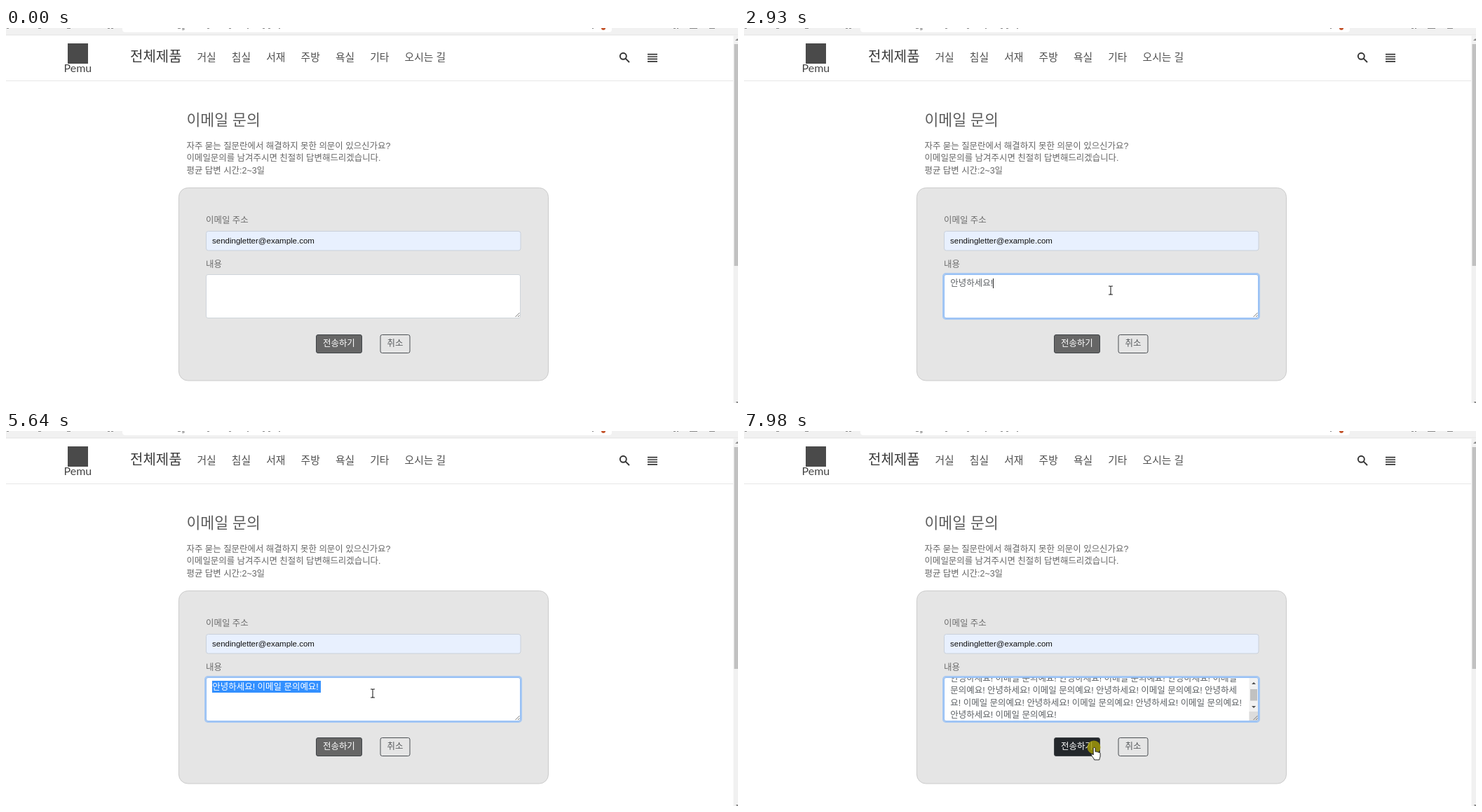
An HTML page that plays this animation: 1044x536 px, repeating every 8 s.

```html
<!DOCTYPE html>
<html lang="ko">
<head>
<meta charset="utf-8">
<title>이메일 문의</title>
<style>
  html, body { margin: 0; width: 100%; height: 100%; overflow: hidden; background: #fff; }
  #stage { position: absolute; left: 0; top: 0; width: 1044px; height: 536px; overflow: hidden; }
  #stage, text { font-family: "Liberation Sans", "Noto Sans CJK KR", "Noto Sans CJK", sans-serif; }
  svg { position: absolute; left: 0; top: 0; }
  #box, #ring {
    position: absolute; left: 285px; top: 352px; width: 447px; height: 61px;
    border: 1px solid #ced4da; border-radius: 3px; overflow: hidden;
  }
  #box { background: #fff; }
  #ring { opacity: 0; border-color: #8fbcf6; box-shadow: 0 0 0 2px #a6c8f3; }
  #typed {
    position: absolute; left: 8.3px; top: 4.3px; width: 432px;
    font-size: 12.47px; line-height: 17.42px; color: #5c6064; white-space: pre-wrap;
  }
  #typed i {
    display: inline-block; width: 1px; height: 14px; margin-right: -1px;
    vertical-align: -2.7px; background: #222;
  }
  #typed u { text-decoration: none; box-shadow: inset 0 -1px #5c6064; }
  #typed b { font-weight: 400; color: #fff; background: #3390ff; padding: 1.75px 0; }
</style>
</head>
<body>
<div id="stage">
  <svg id="page" width="1044" height="536">
    <rect width="1044" height="10" fill="#f1f1f1"/>
    <path d="M166 0H864V2Q864 6 860 6H170Q166 6 166 2Z" fill="#fff"/>
    <path d="M0 10H1044" stroke="#e3e3e3"/>
    <path d="M1 .5h3M46 .5h4M87 .5h5M145 .5h3M150 .5h3M245 .5h4M251 .5h3v2h-3M287 .5h3M318 .5h3M344 .5h2M366 .5h3M374 .5h3M389 .5h2M836 .5h2M952 .5h3M957 .5h2M975 .5h11M1003 .5h8" fill="none" stroke="#888"/>
    <circle cx="852" cy="0" r="3" fill="#c4552d"/>

    <rect x="1037.5" y="10.5" width="7" height="526" fill="#f1f1f1"/>
    <rect x="1038.5" y="23" width="6" height="317" fill="#c1c1c1"/>
    <path d="M1040 18l3-3 1 1v2zM1041 534h3v2h-2z" fill="#8a8a8a"/>
    <path d="M0 75.5H1037" stroke="#e6e6e6"/>

    <rect x="88" y="22" width="29" height="29" fill="#4a4a4a"/>
    <text x="82.5" y="63" font-size="16" fill="#444" style="font-family:Lato,sans-serif">Pemu</text>

    <g fill="none" stroke="#333" stroke-width="1.9">
      <circle cx="880.3" cy="40.3" r="4.5"/>
      <path d="M883.6 43.6L889 49"/>
      <path d="M915 37.6h14M915 41h14M915 44.4h14M915 47.8h14" stroke-width="1.7"/>
    </g>

    <rect x="246.5" y="228.5" width="527" height="275.5" rx="13" fill="#e5e5e5" stroke="#cbcbcb"/>
    <rect x="285.5" y="290.5" width="448.5" height="27.5" rx="3" fill="#e8f0fe" stroke="#c9d0da"/>
    <text x="294" y="308" font-size="11.5" fill="#111">sendingletter@example.com</text>
    <rect id="send" x="442.5" y="438.5" width="65" height="26" rx="2.5" stroke="#3f4347"/>
    <rect x="534" y="438.5" width="42" height="26" rx="2.5" fill="none" stroke="#4b4f53"/>
  </svg>

  <div id="box"><div id="typed"></div></div>

  <svg width="1044" height="536">
    <g id="bar">
      <rect x="720.5" y="353" width="13" height="61" fill="#f1f1f1"/>
      <rect x="720.5" y="401" width="13" height="13" fill="#dcdcdc"/>
      <rect x="722" y="369" width="10" height="16.5" fill="#c1c1c1"/>
      <path d="M724 362l3-3 3 3zM724 393l3 3 3-3z" fill="#505050"/>
    </g>
    <path d="M726.5 413l6-6M730 413l2.5-2.5" stroke="#777"/>
  </svg>
  <div id="ring"></div>

  <svg width="1044" height="536">
    <g id="mouse">
      <circle id="press" r="9.5" fill="#a39b08" fill-opacity=".82"/>
      <path id="beam" d="M-3-6h2.2L0-5.3L.8-6H3M-3 6h2.2L0 5.3L.8 6H3M0-5.3V5.3" fill="none" stroke="#222" stroke-width="1.1"/>
      <path id="arrow" d="M0 0V16L3.7 12.6L6.2 18.3L8.6 17.2L6.2 11.7H11.4Z" fill="#fff" stroke="#111" stroke-width=".9"/>
      <path id="hand" d="M-.8 1.6C-.8 0 2 0 2 1.6V6.5C3 5.8 4.3 6.1 4.5 7C5.5 6.4 6.7 6.8 6.9 7.7C8 7.2 9.1 7.8 9.1 9V13C9.1 15 7.7 16 7.7 18H.6C.5 16-3.6 12.5-3.6 10.8C-3.6 9.4-2 9.4-.8 11Z" fill="#fff" stroke="#111" stroke-width=".9"/>
    </g>
  </svg>
</div>
<script>
const LOOP = 8000, FOCUS = 400, HOVER = 7390;
const $ = id => document.getElementById(id);
const clamp = v => Math.max(0, Math.min(1, v));
const show = (id, on) => { $(id).style.display = on ? '' : 'none'; };

// Each label: left, middle of the line, size, colour, text
const labels = [
  [177, 41, 20, '#3a3a3a', '전체제품'],
  ...['거실', '침실', '서재', '주방', '욕실', '기타', '오시는 길']
    .map((s, i) => [272.5 + i * 49.35, 41.8, 14.8, '#505050', s]),
  [257.5, 131.3, 21.6, '#5a5a5a', '이메일 문의'],
  [257.5, 168.2, 12.45, '#666', '자주 묻는 질문란에서 해결하지 못한 의문이 있으신가요?'],
  [257.5, 185.6, 12.45, '#666', '이메일문의를 남겨주시면 친절히 답변해드리겠습니다.'],
  [257.5, 203, 12.45, '#666', '평균 답변 시간:2~3일'],
  [285, 274.5, 12.45, '#6c6c6c', '이메일 주소'],
  [285, 337, 12.45, '#6c6c6c', '내용'],
  [452, 450.5, 12.45, '#fff', '전송하기'],
  [543.5, 450.5, 12.45, '#55585b', '취소']
];
for (const [x, mid, size, fill, s] of labels) {
  const el = document.createElementNS('http://www.w3.org/2000/svg', 'text');
  el.setAttribute('x', x);
  el.setAttribute('y', mid + size * 0.37);
  el.setAttribute('font-size', size);
  el.setAttribute('fill', fill);
  el.textContent = s;
  $('page').append(el);
}

// Typing bursts: start, interval, settled text, states of the composer
const bursts = [
  [1530, 100, '', 'ㅇ|아|안|안ㄴ|안녀|안녕|안녕ㅎ|안녕하|안녕핫'],
  [2460, 70, '안녕하', '세|셍|세요'],
  [2930, 0, '안녕하세요', '!'],
  [3080, 92.5, '안녕하세요!', ' | ㅇ| 이| 임| 이메| 이멩| 이메이| 이메일| 이메일 '],
  [3950, 130, '안녕하세요! 이메일 ', '무|문'],
  [4230, 100, '안녕하세요! 이메일 ', '문ㅇ|문으|문의|문읭|문의예|문의옝|문의예요'],
  [5090, 200, '안녕하세요! 이메일 문의예요', '!|! ']
];
const keys = bursts.flatMap(([t, dt, base, s]) =>
  s.split('|').map((part, i) => [t + i * dt, base + part]));
const phrase = keys[keys.length - 1][1];
const pastes = [[6760, 2], [6830, 4], [6900, 6], [6970, 8], [7040, 9]];
const last = (list, t, none) => list.reduce((v, k) => t >= k[0] ? k[1] : v, none);

const track = [
  [110, 764, 466], [250, 640, 420], [390, 530, 378], [530, 523, 375],
  [6970, 523, 375], [7040, 516, 371], [7250, 502, 408], [7390, 498, 442], [7530, 499, 452]
];
// The pointer is sampled every 70 ms
function mouseAt(t) {
  t = Math.floor((t - 40) / 70) * 70 + 40;
  const n = track.findIndex(k => k[0] > t);
  if (n < 0) return track[track.length - 1].slice(1);
  if (!n) return track[0].slice(1);
  const a = track[n - 1], b = track[n], p = (t - a[0]) / (b[0] - a[0]);
  return [a[1] + (b[1] - a[1]) * p, a[2] + (b[2] - a[2]) * p];
}

function caretOn(t) {
  if (t < FOCUS || (t >= 930 && t < 1290)) return false;
  return t < 7720;
}

function content(t) {
  if (t >= 5640 && t < 6500) return `<b>${phrase}</b>`;
  const s = t < 6500 ? last(keys, t, '') : phrase.repeat(last(pastes, t, 1));
  const body = /[ㄱ-힣]$/.test(s) ? `${s.slice(0, -1)}<u>${s.slice(-1)}</u>` : s;
  return body + (caretOn(t) ? '<i></i>' : '');
}

function mix(p) {
  const c = [35, 39, 43].map(v => Math.round(102 + (v - 102) * p));
  return `rgb(${c})`;
}

let shown = null;
function draw(t) {
  const html = content(t), full = t >= 7040;
  if (html !== shown) $('typed').innerHTML = shown = html;
  $('typed').style.width = full ? '419px' : '432px';
  $('typed').style.top = full ? '-7px' : '4.3px';
  show('bar', full);

  $('ring').style.opacity = clamp((t - FOCUS) / 150);
  $('send').setAttribute('fill', mix(clamp((t - HOVER) / 150)));

  const [x, y] = mouseAt(t);
  const inBox = x < 734 && y > 353 && y < 415, onSend = t >= HOVER;
  show('mouse', t >= 120);
  show('beam', inBox);
  show('hand', onSend);
  show('arrow', !inBox && !onSend);
  show('press', (t >= FOCUS && t < 530) || t >= 7850);
  $('mouse').setAttribute('transform', `translate(${x} ${y})`);
}

const start = performance.now();
function tick() {
  draw((performance.now() - start) % LOOP);
  requestAnimationFrame(tick);
}
tick();
</script>
</body>
</html>
```
